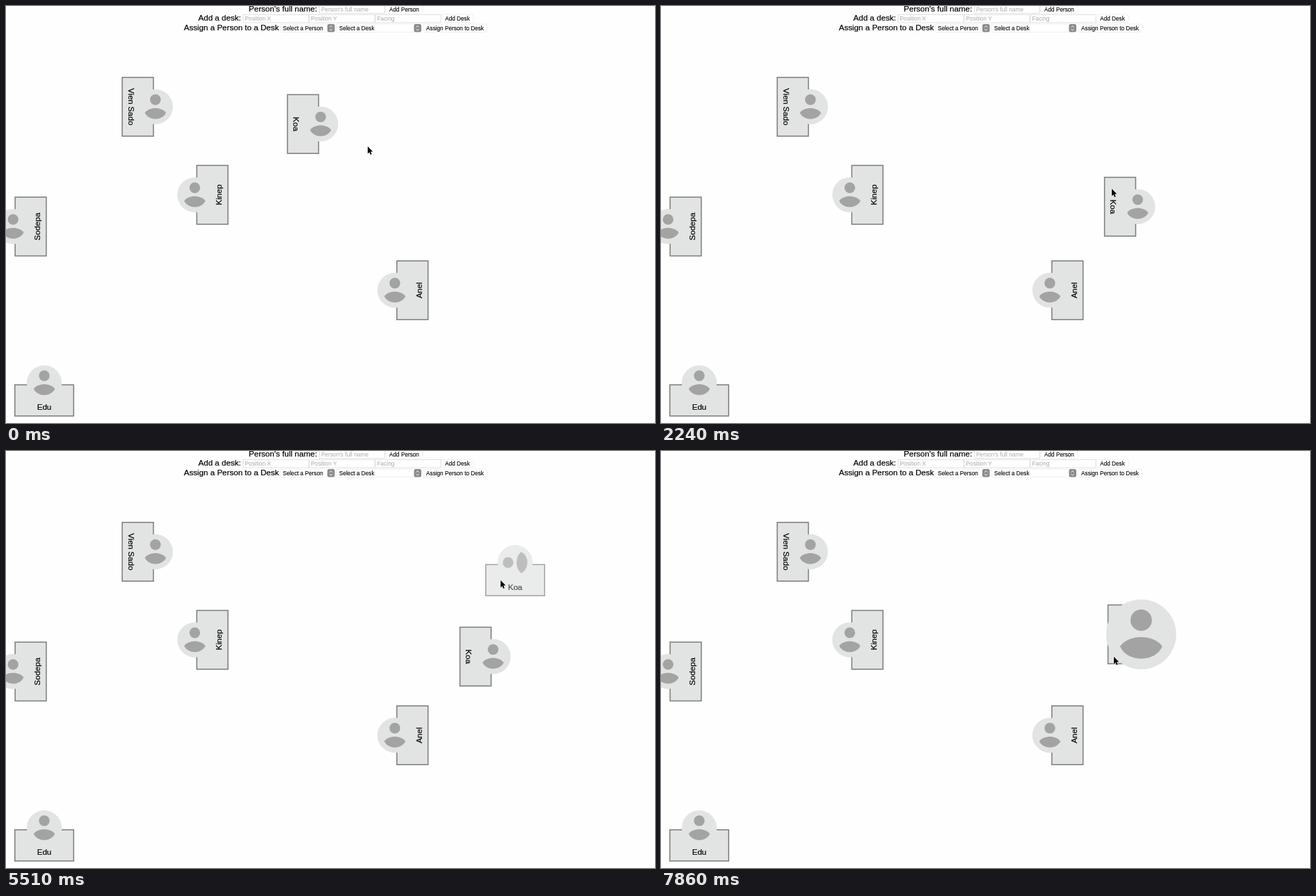
Animation of 933x600 px, one loop 8000 ms. Source, as an HTML page:

```html
<!DOCTYPE html>
<html lang="en">
<head>
<meta charset="utf-8">
<title>Desk planner</title>
<style>
  html, body { margin: 0; width: 100%; height: 100%; overflow: hidden; background: #fefefe; }
  svg { display: block; width: 933px; height: 600px; font-family: "Liberation Sans", Arial, sans-serif; }
  .label { font-size: 11.6px; stroke: #000; stroke-width: .2; }
  .small { font-size: 8.2px; stroke: #000; stroke-width: .1; }
  .hint { font-size: 8.3px; fill: #a9a9a9; }
  .mid { text-anchor: middle; }
  .field { fill: #fff; stroke: #d9d9d9; stroke-width: .8; }
  .button { fill: #fff; stroke: #ebebeb; stroke-width: .8; }
  .stepper { fill: #8b8b8b; }
  .arrows { fill: none; stroke: #fff; stroke-width: 1; }
  .top { fill: #e2e4e3; stroke: #7b7b7b; stroke-width: 1.5; }
  .disc { fill: #e2e4e3; }
  .person { fill: #a3a3a3; }
  #ghost { opacity: .7; }
</style>
</head>
<body>
<svg viewBox="0 0 933 600">
  <defs>
    <g id="avatar">
      <circle class="disc" r="25.2"/>
      <g class="person">
        <circle cy="-10.2" r="7.7"/>
        <path d="M-15.2 8.7C-9-.2 9-.2 15.2 8.7C10 20.4-10 20.4-15.2 8.7Z"/>
      </g>
    </g>
  </defs>
  <g id="form"></g>
  <g id="desks"></g>
  <g id="ghost"></g>
  <path id="cursor" d="M0 0V10.4L2.4 8.2L4 11.9L5.7 11.2L4.2 7.5H7.4Z"
        fill="#000" stroke="#fff" stroke-width="1" paint-order="stroke"/>
</svg>
<script>
const $ = id => document.getElementById(id);
const LOOP = 8000;
const REFRESH = 125;      // ms between pictures while something moves
const DROP_SHIFT = 87;    // a dropped desk lands this far below its ghost

// Form at the top
const text = (cls, x, y, s) => `<text class="${cls}" x="${x}" y="${y}">${s}</text>`;
const box = (cls, x, y, w, r) => `<rect class="${cls}" x="${x}" y="${y}" width="${w}" height="11.5" rx="${r}"/>`;
const field = (x, y, s) => box('field', x + .5, y + .5, 94, 0) + text('hint', x + 3, y + 9.2, s);
const button = (x, y, w, s) => box('button', x, y, w, 2.5) + text('small mid', x + w / 2, y + 9, s);
const select = (x, y, w, s) =>
  box('button', x, y, w, 2.5) + text('small', x + 4, y + 9, s) + box('stepper', x + w - 10.5, y, 10.5, 2.5) +
  `<path class="arrows" d="M${x + w - 7.3} ${y + 4.6}l2-2l2 2m0 2.6l-2 2l-2-2"/>`;

$('form').innerHTML =
  text('label', 349, 7.5, "Person's full name:") + field(450, -1.5, "Person's full name") + button(546, -1.3, 53, 'Add Person') +
  text('label', 276.5, 21.2, 'Add a desk:') +
  ['Position X', 'Position Y', 'Facing'].map((s, i) => field(340.5 + 95 * i, 12, s)).join('') +
  button(626, 12.2, 46, 'Add Desk') +
  text('label', 255.7, 34.8, 'Assign a Person to a Desk') + select(394, 26, 78.5, 'Select a Person') +
  select(475, 26, 122, 'Select a Desk') + button(599.5, 26, 92, 'Assign Person to Desk');

// A desk is drawn facing up and turned; its avatar is turned back upright
const body = (name, turn) =>
  `<rect class="top" x="-42.3" y="-22.4" width="84.6" height="44.8"/>` + text('label mid', 0, 13.8, name) +
  `<g transform="translate(0 -25.3) rotate(${-turn})"><use href="#avatar"/></g>`;
const place = (p, turn = 0) => `translate(${p.x} ${p.y}) rotate(${turn})`;
const desk = (name, x, y, turn) => `<g transform="${place({ x, y }, turn)}">${body(name, turn)}</g>`;
const home = { x: 427, y: 169.8 };

$('desks').innerHTML =
  desk('Vien Sado', 189.5, 145, 90) +
  desk('Kinep', 296.7, 271.7, -90) +
  desk('Sodepa', 35.5, 317.3, -90) +
  desk('Anel', 584.3, 409, -90) +
  desk('Edu', 55, 567.5, 0) +
  desk('Koa', home.x, home.y, 90);
$('ghost').innerHTML = body('Koa', 90);
const mover = $('desks').lastElementChild;
const face = mover.querySelector('use');

// What the hand does: action, start, end, pointer target.
// "drag" carries a ghost of the desk, "pull" carries it unseen.
const script = [
  ['go', 390, 600, 421, 189],
  ['drag', 960, 1460, 636, 216],
  ['drag', 1580, 1580, 654, 221],
  ['drop', 1760],
  ['go', 2240, 2240, 648, 263],
  ['drag', 2390, 2760, 645, 142],
  ['drop', 3060],
  ['go', 3200, 3900, 618, 216],
  ['drag', 4030, 4270, 638, 178],
  ['drag', 4390, 4390, 636, 170],
  ['drop', 4510],
  ['go', 4640, 5010, 654, 296],
  ['drag', 5240, 5510, 711, 186],
  ['drop', 5780],
  ['go', 6140, 6270, 725, 264],
  ['pull', 6410, 6410, 658, 235],
  ['pull', 6560, 6710, 658, 168],
  ['drop', 7160],
  ['go', 7300, 7860, 651, 296]
];

// Share of a move done at time t, in whole refreshes
function progress(t, start, end) {
  const n = Math.round((end - start) / REFRESH);
  const k = t >= end ? n : Math.floor((t - start) / (end - start) * n);
  return (k + 1) / (n + 1);
}

const carry = (item, grab, p) => ({ x: item.x + p.x - grab.x, y: item.y + p.y - grab.y });

// Replays the script up to time t
function pose(t) {
  let pointer = { x: 520, y: 202 }, seat = home, grab = null, ghost = null;
  for (const [action, start, end, x, y] of script) {
    if (t < start) break;
    if (action === 'drop') {
      const p = carry(seat, grab, pointer);
      seat = { x: p.x, y: p.y + DROP_SHIFT };
      grab = ghost = null;
      continue;
    }
    if (action !== 'go') grab ??= pointer;
    const f = progress(t, start, end);
    pointer = { x: pointer.x + (x - pointer.x) * f, y: pointer.y + (y - pointer.y) * f };
    ghost = action === 'drag' ? carry(seat, grab, pointer) : null;
  }
  return { pointer, seat, ghost };
}

// The avatar doubles in size when pointed at
const zoom = t => t < 6140 ? 1 : 1 + Math.min(1, (t - 6000) / 420);

function draw(t) {
  const { pointer, seat, ghost } = pose(t);
  $('cursor').setAttribute('transform', place(pointer));
  mover.setAttribute('transform', place(seat, 90));
  face.setAttribute('transform', `scale(${zoom(t)})`);
  $('ghost').style.display = ghost ? '' : 'none';
  if (ghost) $('ghost').setAttribute('transform', place(ghost));
}

const begin = performance.now();
function frame() {
  draw((performance.now() - begin) % LOOP);
  requestAnimationFrame(frame);
}
frame();
</script>
</body>
</html>
```
